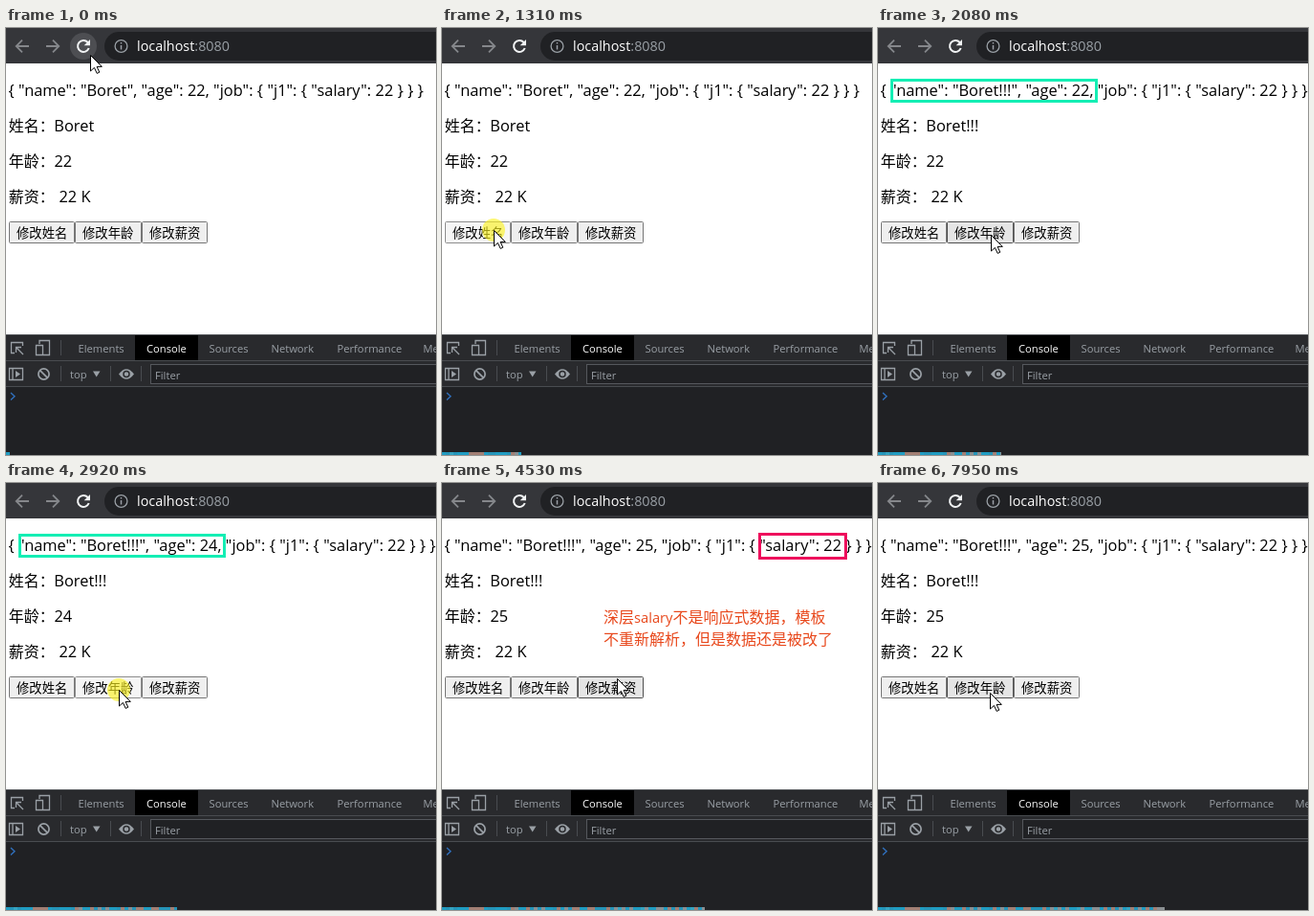
These frames come from a looping animation (450 by 446 pixels, 8000 ms). An HTML page:

```html
<!DOCTYPE html>
<html lang="zh-CN">
<head>
<meta charset="utf-8">
<title>localhost:8080</title>
<style>
  html, body { margin: 0; width: 100%; height: 100%; overflow: hidden; background: #fff; }
  svg { display: block; }
  text { font-family: "Open Sans", "Noto Sans CJK SC", "Noto Sans CJK", sans-serif; white-space: pre; }
  .page { font-size: 16px; fill: #000; }
  .latin { font-size: 16.4px; }
  .json { word-spacing: .1px; }
  .note { font-size: 16px; fill: #e8481c; }
  .url { font-size: 14.4px; fill: #fff; }
  .tool { font-size: 11.2px; fill: #9aa0a6; }
  .btn rect { fill: #efefef; stroke: #767676; }
  .btn text { font-size: 13.33px; fill: #000; }
  .btn.hover rect { fill: #e5e5e5; stroke: #4f4f4f; }
  .btn.down rect { fill: #f5f5f5; stroke: #8d8d8d; }
  .icon { fill: none; stroke: #9aa0a6; stroke-width: 1.3; }
  .nav { fill: none; stroke-width: 1.8; }
  .mark { fill: none; stroke-width: 3; }
</style>
</head>
<body>
<svg id="stage" width="450" height="446" viewBox="0 0 450 446">
  <rect width="450" height="446" fill="#fff"/>

  <!-- browser toolbar -->
  <rect width="450" height="37" fill="#35363a"/>
  <g class="nav" stroke="#85878b">
    <path d="M24 19H11M17 12.7L10.7 19L17 25.3"/>
    <path d="M42 19H55M49 12.7L55.3 19L49 25.3"/>
  </g>
  <circle id="reloadHover" cx="81" cy="19" r="14" fill="#4d4e52"/>
  <path class="nav" stroke="#f1f3f4" style="stroke-width:2" d="M85.6 15A6 6 0 1 0 86.7 21"/>
  <path fill="#f1f3f4" d="M88 12V18.3H81.7Z"/>
  <rect x="103" y="4" width="380" height="30" rx="15" fill="#202124"/>
  <circle class="icon" cx="120.5" cy="19" r="6.4"/>
  <path class="icon" style="stroke-width:1.5" d="M120.5 18V22.5M120.5 15V16.6"/>
  <text class="url" x="137" y="24">localhost<tspan fill="#9aa0a6">:8080</tspan></text>

  <!-- page -->
  <text class="page latin json" id="json" x="2.5" y="71"></text>
  <text class="page" x="2.7" y="108">姓名：</text>
  <text class="page latin" id="name" x="50.3" y="108"></text>
  <text class="page" x="2.7" y="145">年龄：</text>
  <text class="page latin" id="age" x="50.5" y="145"></text>
  <text class="page" x="2.7" y="182">薪资：</text>
  <text class="page latin" x="55.5" y="182">22 K</text>
  <g id="buttons"></g>
  <rect id="greenBox" class="mark" x="14.5" y="54.5" width="214" height="22" stroke="#14eeb4"/>
  <rect id="redBox" class="mark" x="332.5" y="53.5" width="90" height="25" stroke="#ee0f5c"/>
  <g id="note">
    <text class="note" x="169" y="146">深层<tspan font-size="14.7">salary</tspan>不是响应式数据，模板</text>
    <text class="note" x="169" y="169">不重新解析，但是数据还是被改了</text>
  </g>

  <!-- developer tools -->
  <rect y="320" width="450" height="126" fill="#202124"/>
  <rect y="320" width="450" height="54" fill="#292a2d"/>
  <path stroke="#494c50" d="M0 320.5H450M0 347.5H450M0 374.5H450M57.5 326V342M57.5 353V369M109.5 353V369M141.5 353V369"/>
  <rect x="135" y="321" width="66" height="26" fill="#000"/>
  <g id="tabs"></g>
  <g class="icon">
    <path d="M9 339.5H5.5V328.5H17.5V332"/>
    <path d="M18 341L11 334M10.5 339V333.5H16"/>
    <path d="M35 330V326.5H45.5V341.5H39M31.5 331.5H38.5V341.5H31.5Z"/>
    <path d="M3.5 355.5H17.5V367.5H3.5ZM7 355.5V367.5"/>
    <circle cx="39.5" cy="361.5" r="5.6" stroke-width="1.7"/>
    <path stroke-width="1.7" d="M35.6 357.6L43.4 365.4"/>
  </g>
  <path fill="#9aa0a6" d="M10 358L15 361.5L10 365ZM91 358.5H98.5L94.7 364.5Z"/>
  <path fill="#9aa0a6" d="M118 361.5Q126 351 134 361.5Q126 372 118 361.5Z"/>
  <circle cx="126" cy="361.5" r="3" fill="#9aa0a6" stroke="#292a2d" stroke-width="1.5"/>
  <text class="tool" x="67" y="366">top</text>
  <rect x="151.5" y="351.5" width="310" height="20" fill="#202124" stroke="#55585d"/>
  <text class="tool" x="156" y="366.5">Filter</text>
  <path fill="none" stroke="#3070bd" stroke-width="1.4" d="M5 381L9 384.8L5 388.6"/>

  <svg id="bar" x="0" y="443" width="4" height="3"></svg>
  <circle id="press" r="12" fill="#fbf21c" fill-opacity=".62"/>
  <path id="cursor" fill="#fff" stroke="#000" stroke-linejoin="round"
        d="M0 0V16.5L3.9 12.9L6.7 18.9L9.3 17.7L6.6 11.9H11.8Z"/>
</svg>
<script>
const LOOP = 8000, STEP = 70, HOLD_STEP = 65, HOLD_START = 4530, HOLD_END = 7600;
const $ = id => document.getElementById(id);

function add(parent, tag, attrs, text = "") {
  const el = document.createElementNS("http://www.w3.org/2000/svg", tag);
  for (const key in attrs) el.setAttribute(key, attrs[key]);
  el.textContent = text;
  return parent.appendChild(el);
}

// step, x, y of the pointer tip
const path = [
  [0, 89, 28], [2, 89, 28], [11, 62, 193], [16, 55, 211], [27, 55, 211], [30, 119, 216],
  [44, 119, 216], [48, 184, 204], [65, 184, 204], [66, 183, 205], [71, 118, 219]
];
// steps at which the mouse goes down; it comes up two steps later
const nameClicks = [19, 22, 25], ageClicks = [33, 37, 41], payClicks = [50, 54, 58, 61];
const allClicks = [...nameClicks, ...ageClicks, ...payClicks];
const HELD = 2;

const buttons = [["修改姓名", 3, 69], ["修改年龄", 72, 70], ["修改薪资", 142, 69]].map(([label, x, w]) => {
  const el = add($("buttons"), "g", { class: "btn" });
  add(el, "rect", { x: x + .5, y: 202.5, width: w - 1, height: 22, rx: 1 });
  add(el, "text", { x: x + 8, y: 219 }, label);
  return { el, x, w };
});

[["Elements", 75.5], ["Console", 147], ["Sources", 212.5], ["Network", 277.5], ["Performance", 346.5], ["Memory", 436.5]]
  .forEach(([label, x]) => {
    const tab = add($("tabs"), "text", { class: "tool", x, y: 339 }, label);
    if (label === "Console") tab.style.fill = "#fff";
  });

const tints = ["#1f9cc2", "#1f9cc2", "#2594b8", "#35a3c0", "#8a8f92", "#a27f74"];
for (let i = 0; i < 76; i++) {
  const r = Math.abs(Math.sin(i * 12.9898 + 4) * 43758.5453) % 1;
  add($("bar"), "rect", { x: i * 4, y: 0, width: 4, height: 3, fill: i ? tints[Math.floor(r * tints.length)] : tints[0] });
}

function stepAt(t) {
  if (t < HOLD_START) return Math.floor((t + 20) / STEP);
  if (t < HOLD_END) return HOLD_STEP;
  return HOLD_STEP + 1 + Math.floor((t - HOLD_END) / STEP);
}

function pointerAt(n) {
  let i = 0;
  while (i < path.length - 2 && n >= path[i + 1][0]) i++;
  const [n0, x0, y0] = path[i], [n1, x1, y1] = path[i + 1];
  const p = Math.min(1, (n - n0) / (n1 - n0)), e = p * p * (3 - 2 * p);
  return [x0 + (x1 - x0) * e, y0 + (y1 - y0) * e];
}

const released = (clicks, n) => clicks.filter(c => n >= c + HELD).length;
const show = (id, on) => $(id).setAttribute("visibility", on ? "visible" : "hidden");

function draw(n) {
  const [x, y] = pointerAt(n);
  const down = allClicks.some(c => n >= c && n < c + HELD);
  const name = "Boret" + "!".repeat(released(nameClicks, n));
  const age = 22 + released(ageClicks, n);

  $("json").textContent = `{ "name": "${name}", "age": ${age}, "job": { "j1": { "salary": 22 } } }`;
  $("name").textContent = name;
  $("age").textContent = age;

  for (const b of buttons) {
    const over = x >= b.x && x < b.x + b.w && y >= 202 && y < 225;
    b.el.setAttribute("class", "btn" + (over ? (down ? " down" : " hover") : ""));
  }
  show("reloadHover", Math.hypot(x - 81, y - 19) < 14);
  show("greenBox", n >= 21 && n < 45);
  show("redBox", n >= 49 && n <= HOLD_STEP);
  show("note", n >= 62 && n <= HOLD_STEP);
  show("press", down);

  $("press").setAttribute("transform", `translate(${x - 1} ${y})`);
  $("cursor").setAttribute("transform", `translate(${Math.round(x) - .5} ${Math.round(y) + .5})`);
  $("bar").setAttribute("width", Math.round(4 + n * 4.17));
}

let last = -1;
function tick() {
  const n = stepAt(performance.now() % LOOP);
  if (n !== last) draw(last = n);
  requestAnimationFrame(tick);
}
tick();
</script>
</body>
</html>
```
